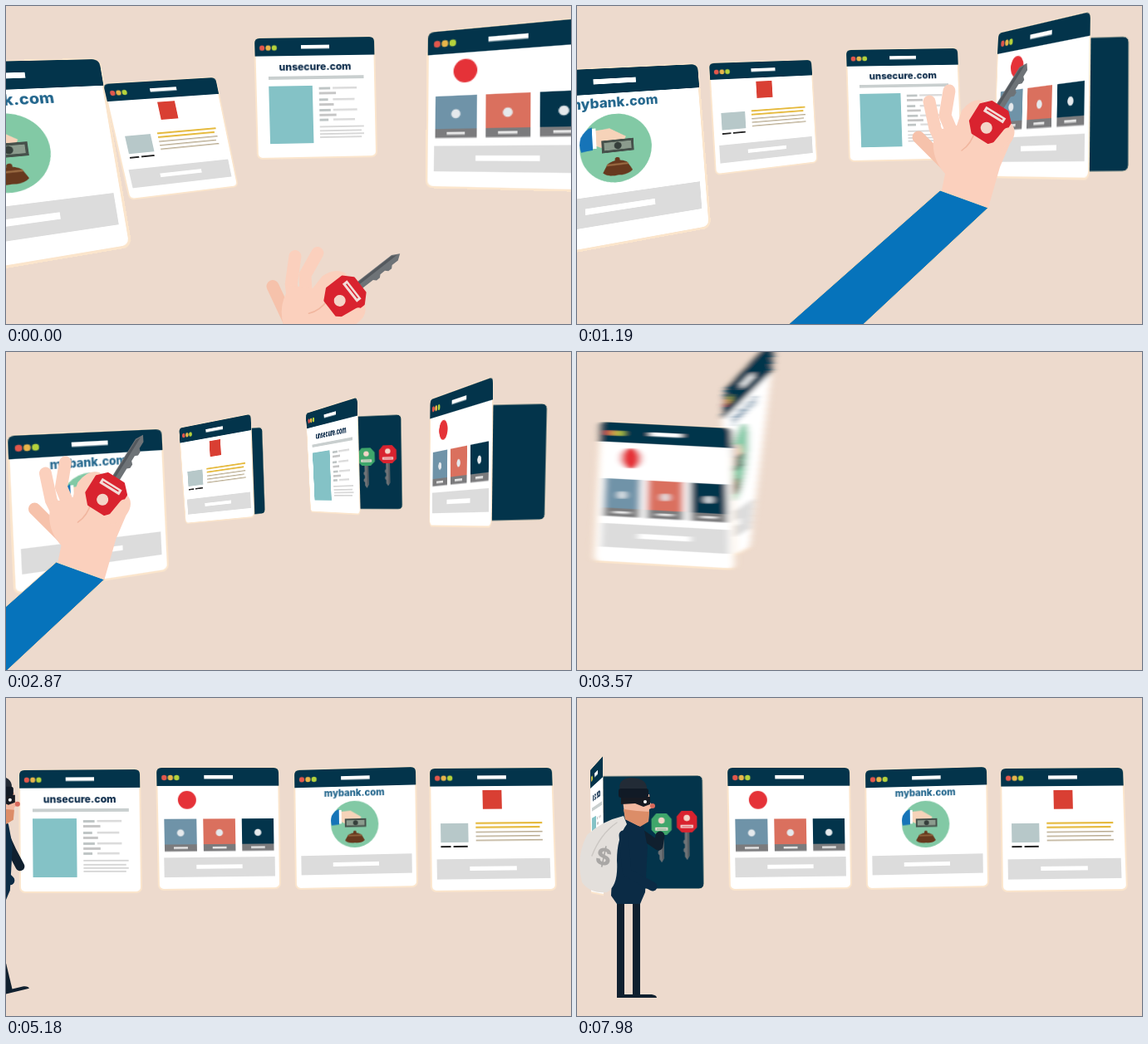
An HTML page that plays this animation: 680 px wide and 383 px high, repeating every 8 s.

```html
<!DOCTYPE html>
<html lang="en">
<head>
<meta charset="utf-8">
<title>One key for every site</title>
<style>
  html, body { margin: 0; width: 100%; height: 100%; overflow: hidden; background: #eddacd; }
  #stage { position: relative; width: 680px; height: 383px; overflow: hidden; }
  #cards, #actors { position: absolute; left: 0; top: 0; width: 680px; height: 383px; }
  .card { position: absolute; left: 0; top: 0; overflow: visible; transform-origin: 0 0; }
  text { font-family: Inter, sans-serif; font-weight: 800; text-anchor: middle; }
</style>
</head>
<body>
<div id="stage">
  <div id="cards"></div>
  <svg id="actors" viewBox="0 0 680 383">
    <defs>
      <filter id="whip" x="-10%" width="120%"><feGaussianBlur id="blur" stdDeviation="0 0"/></filter>
    </defs>
    <g id="hand"></g>
    <g id="thief"></g>
  </svg>
</div>
<script>
const SIZE = 148, LOOP = 8000, STEP = 70;
const NAVY = '#03344b', GREY = '#dcdcdc', RED = '#d9232f', SKIN = '#fbd0bd', SUIT = '#0b2b45', DARK = '#10202f';
const $ = id => document.getElementById(id);

// ---------- drawing helpers ----------
const rect = (x, y, w, h, fill, more = '') =>
  `<rect x="${x}" y="${y}" width="${w}" height="${h}" fill="${fill}" ${more}/>`;
const circle = (x, y, r, fill) => `<circle cx="${x}" cy="${y}" r="${r}" fill="${fill}"/>`;
const shape = (d, fill, more = '') => `<path d="${d}" fill="${fill}" ${more}/>`;
const line = (d, color, width, more = '') =>
  `<path d="${d}" fill="none" stroke="${color}" stroke-width="${width}" stroke-linecap="round" stroke-linejoin="round" ${more}/>`;
const footer = (y, w = 135) => rect(7, y, w, 24, GREY) + rect(46, y + 9, 56, 5, '#fff');

function key(color, transform) {
  return `<g transform="${transform}">
    ${shape('M-5-18V-75L0-84 5-77V-68L8-65V-60L5-57V-50L8-47V-42L5-39V-18Z', '#6e7377')}
    ${shape('M-4-18V-74L-1-80V-18Z', '#54595e')}
    ${shape('M-11-22H11L21-12V11L11 22H-11L-21 11V-12Z', color, `stroke="${color}" stroke-width="3" stroke-linejoin="round"`)}
    ${rect(-14, -14, 28, 7, '#f3dcd8')}${rect(-11, -11.5, 22, 1.5, color)}
    ${circle(0, 8, 7, '#f4d5c8')}
  </g>`;
}

// ---------- page contents, in a 148 px square ----------
const tile = (x, color) => rect(x, 62, 39, 31, color) + rect(x, 93, 39, 8.5, '#7b7b7d') +
  rect(x + 11, 96, 17, 2.5, '#e6e6e6') + circle(x + 19.5, 79, 4.3, '#e5e9ec');

const textRows = (ys, x, w, color, height = 1.8) =>
  ys.map((y, i) => rect(x, y, w - (i % 2) * 3, height, color)).join('');

const contents = {
  unsecure: `<text x="74" y="40" font-size="12.5" fill="#0c2b4a">unsecure.com</text>
    ${rect(16, 47, 118, 4, '#c9cfcf')}${rect(16, 59, 54, 71, '#84c2c6')}
    ${textRows([61, 75, 88, 100], 78, 14, '#bfc5c5', 3)}${textRows([61, 75, 88, 100], 95, 30, '#dadada', 2.5)}
    ${textRows([67, 81, 94], 78, 21, '#c6c6c6', 3)}${textRows([109, 114, 118, 122], 78, 55, '#d4d4d4')}`,
  bank: `<text x="73" y="34" font-size="11.4" fill="#21658c">mybank.com</text>
    ${circle(73, 69, 29, '#82c9a5')}
    ${shape('M45 58Q49 51 54 50V69L45 70Q43 64 45 58Z', '#1674b8')}${rect(54, 51, 3, 17, '#fff')}
    ${shape('M57 53L68 52 81 60 79 64 70 62 72 69 65 70 57 66Z', '#f6d3b9')}
    ${rect(61, 62, 26, 10.5, '#46514b')}${rect(63, 64, 22, 6.5, '#8b9b8d')}${circle(74, 67.3, 3, '#353f3b')}
    ${shape('M65 82Q73 77 81 82L85 89Q81 93 73 92Q65 93 61 89Z', '#67391e')}
    ${line('M65 83H81', '#9a6b42', 1.5)}${circle(73, 79, 2, '#67391e')}${footer(107)}`,
  shop: `${circle(36, 39, 11, '#e53238')}${tile(8, '#6f93a8')}${tile(55, '#da705e')}${tile(102, NAVY)}${footer(109)}`,
  mail: `${rect(63, 27, 23, 23, '#d93f33')}${rect(12, 67, 33, 23, '#b7c8c9')}
    ${rect(12, 94, 12, 2, '#222')}${rect(27, 94, 17, 2, '#222')}
    ${textRows([66, 71], 54, 80, '#e5b93c', 2.2)}${textRows([77, 82, 87], 54, 80, '#b9ab90', 1.5)}${footer(110)}`
};

const frontArt = name => `${rect(0, 0, SIZE, SIZE, '#fff', 'rx="6" stroke="#fbe5cc" stroke-width="2"')}
  ${shape('M0 22V6Q0 0 6 0H142Q148 0 148 6V22Z', NAVY)}
  ${circle(9, 12, 3.2, '#e2574c')}${circle(16.5, 12, 3.2, '#e8b54a')}${circle(24, 12, 3.2, '#b5d23c')}
  ${rect(57, 9, 35, 4.5, '#fff')}${contents[name]}`;

const backArt = name => rect(2, 7, 136, 137, NAVY, 'rx="6" stroke="#fbe5cc" stroke-width="1"') +
  (name === 'unsecure' ? key('#3fa66b', 'translate(87 66) rotate(180) scale(.55)') +
    key(RED, 'translate(118 63) rotate(180) scale(.55)') : '');

// ---------- timing ----------
const mix = (a, b, p) => a.map((v, i) => v + (b[i] - v) * p);
const smooth = p => p * p * (3 - 2 * p);
const easeOut = p => 1 - (1 - p) ** 3;
const linear = p => p;

// Each key is [time, ...values].
function track(keys, t, ease = linear) {
  if (t <= keys[0][0]) return keys[0].slice(1);
  for (let i = 1; i < keys.length; i++) {
    const [a, b] = [keys[i - 1], keys[i]];
    if (t < b[0]) return mix(a.slice(1), b.slice(1), ease((t - a[0]) / (b[0] - a[0])));
  }
  return keys[keys.length - 1].slice(1);
}

const shift = (quad, dx) => quad.map((v, i) => i % 2 ? v : v + dx);

// Quads run top left, top right, bottom right, bottom left.
function route(drift, entry, rest, whip) {
  const last = mix(drift[1], drift[2], 2.2);
  whip = whip || shift(last, -500);
  return [[0, ...drift[0]], [1190, ...drift[1]], [2030, ...drift[2]], [3360, ...last],
    [3570, ...whip], [3710, ...shift(whip, -320)], [3711, ...shift(entry, 320)],
    [4130, ...shift(entry, 320)], [4340, ...entry], [4900, ...rest]];
}

const cards = [
  { name: 'unsecure', lift: 16,
    route: route([[299, 39, 443, 37, 446, 181, 303, 184], [324, 53, 458, 51, 463, 184, 328, 187],
      [345, 65, 473, 61, 476, 189, 350, 190]],
      [446, 112, 562, 110, 564, 234, 450, 235], [16, 87, 161, 86, 163, 234, 17, 234]),
    door: [[2150, 0], [2700, 60], [3200, 60], [3400, 0], [6800, 0], [7500, 84]] },
  { name: 'bank', lift: 24,
    route: route([[-155, 70, 112, 64, 150, 289, -130, 336], [-72, 80, 145, 70, 160, 266, -65, 307],
      [-30, 92, 169, 83, 180, 264, -22, 298]],
      [530, 105, 662, 102, 664, 218, 534, 222], [347, 87, 493, 83, 495, 227, 349, 230],
      [178, 44, 240, -22, 208, 235, 160, 262]),
    door: [[3020, 0], [3200, 30], [3400, 0]] },
  { name: 'shop', lift: 28,
    route: route([[508, 32, 712, 13, 712, 223, 506, 218], [507, 33, 676, 28, 676, 204, 501, 206],
      [509, 47, 668, 43, 666, 205, 506, 208]],
      [382, 89, 515, 86, 512, 213, 391, 213], [181, 84, 328, 84, 330, 229, 184, 231],
      [28, 84, 186, 92, 190, 262, 20, 252]),
    door: [[560, 0], [1190, 49], [2030, 60], [3200, 60], [3400, 0]] },
  { name: 'mail', lift: 16,
    route: route([[117, 94, 252, 86, 279, 217, 149, 233], [159, 69, 282, 65, 289, 188, 167, 203],
      [187, 82, 301, 76, 306, 193, 195, 205]],
      [610, 28, 880, 0, 880, 300, 614, 253], [510, 85, 657, 84, 662, 231, 512, 233]),
    door: [[2620, 0], [3000, 50], [3200, 50], [3400, 0]] }
];

for (const card of cards) for (const [side, art] of [['back', backArt], ['front', frontArt]]) {
  $('cards').insertAdjacentHTML('beforeend',
    `<svg class="card" width="${SIZE}" height="${SIZE}">${art(card.name)}</svg>`);
  card[side] = $('cards').lastElementChild;
}

// Perspective matrix that maps the square page onto a quad.
function quadMatrix([x0, y0, x1, y1, x2, y2, x3, y3]) {
  const ax = x1 - x2, ay = y1 - y2, bx = x3 - x2, by = y3 - y2;
  const sx = x0 - x1 + x2 - x3, sy = y0 - y1 + y2 - y3, det = ax * by - bx * ay;
  const g = (sx * by - bx * sy) / det, h = (ax * sy - sx * ay) / det;
  const col = (...v) => v.map(n => (n / SIZE).toFixed(9)).join();
  return `matrix3d(${col(x1 - x0 + g * x1, y1 - y0 + g * y1, 0, g)},` +
    `${col(x3 - x0 + h * x3, y3 - y0 + h * y3, 0, h)},0,0,1,0,${x0},${y0},0,1)`;
}

function swing([x0, y0, x1, y1, x2, y2, x3, y3], degrees, lift) {
  const c = Math.cos(degrees * Math.PI / 180), s = Math.sin(degrees * Math.PI / 180) * lift;
  return [x0, y0, x0 + (x1 - x0) * c, y1 - s, x3 + (x2 - x3) * c, y2 + s / 5, x3, y3];
}

// ---------- hand with key, centred on the key's head ----------
$('hand').innerHTML = `
  ${line('M-86 18L-52 52', '#f6c2ab', 15)}
  ${shape('M-60 82L-424 404H-324L-2 103Z', '#0673bb', 'stroke="#f7d9b5"')}
  ${line('M-73-25L-66 8 -48 44', SKIN, 15)}${line('M-49-38L-54-8 -38 30', SKIN, 15)}
  ${shape('M-58 82L-54 62Q-74 40-66 10L-40 4-34-14Q-22-30-8-26L8-12 26 2Q34 12 24 26L12 54-2 103Z', SKIN)}
  ${line('M-34 34Q-22 26-18 10', '#f1b69f', 1.5)}
  ${key(RED, 'rotate(32)')}
  ${line('M8 30L22 13', SKIN, 13)}`;

const handPath = [[0, 408, 350, 20], [490, 510, 148, 0], [1190, 497, 140, 0], [1750, 350, 172, 0],
  [2100, 348, 169, 0], [2520, 208, 170, 0], [2660, 208, 168, 0], [2970, 92, 172, 0],
  [3090, 92, 170, 0], [3360, -80, 430, 10]];

// ---------- burglar ----------
const leg = (id, x) => `<g id="${id}">${rect(x, 236, 9, 124, DARK)}${shape(`M${x} 357H${x + 23}Q${x + 29} 358 ${x + 29} 361H${x}Z`, DARK)}</g>`;
$('thief').innerHTML = `
  ${leg('legA', 48)}${leg('legB', 67)}
  <path id="farArm"/>
  ${shape('M52 146Q68 142 80 154L85 180 82 234 76 248H48L41 238 44 180Z', SUIT)}
  ${shape('M56 142Q30 148 12 165Q-2 192 6 222Q16 236 36 234Q50 226 48 196Q48 168 60 152Z', '#e3dfdb')}
  ${line('M48 150Q28 164 18 190', '#cbc7c3', 1.5)}
  <text x="32" y="201" font-size="28" fill="#a9a7a5" transform="rotate(12 32 192)">$</text>
  ${shape('M54 116H87L88 126 93 131 87 134 86 148 74 154 58 146Z', '#f2b79f')}
  ${shape('M56 134L72 136 87 137 86 149 76 155 58 146Z', '#dc8d68')}
  ${shape('M53 119H88V128L80 131 70 127 53 128Z', '#171a22')}${circle(82, 125, 2, '#fff')}${circle(91, 130, 3, '#d8695c')}
  ${shape('M52 112Q48 98 64 96Q82 96 84 107V112Z', '#222b36')}${rect(50, 109, 36, 11, '#111a26', 'rx="3"')}
  <path id="nearArm"/>`;

for (const id of ['farArm', 'nearArm'])
  for (const [name, value] of Object.entries({ fill: 'none', stroke: id === 'farArm' ? DARK : SUIT,
    'stroke-width': 11, 'stroke-linecap': 'round', 'stroke-linejoin': 'round' }))
    $(id).setAttribute(name, value);

const nearArm = [[5600, 56, 165, 60, 200, 82, 222], [5900, 56, 165, 88, 193, 116, 150],
  [6760, 56, 165, 88, 193, 116, 150], [7300, 56, 165, 60, 210, 91, 227]];
const farArm = [[5600, 72, 160, 84, 186, 94, 205], [5900, 72, 160, 94, 174, 114, 153],
  [6760, 72, 160, 94, 174, 114, 153], [7400, 72, 160, 98, 178, 100, 166]];

function drawThief(t) {
  const walking = t < 5740;
  const [x] = track([[4760, -135], [5740, 0]], t);
  const stride = walking ? Math.sin(t / 95) * 15 : 0;
  $('thief').setAttribute('transform', `translate(${x} ${-Math.abs(stride) / 6})`);
  $('legA').setAttribute('transform', `rotate(${stride} 53 238)`);
  $('legB').setAttribute('transform', `rotate(${-stride} 71 238)`);
  const picking = t > 5900 && t < 6760 ? Math.sin((t - 6370) / 60) * 2 : 0;
  for (const [id, keys] of [['nearArm', nearArm], ['farArm', farArm]]) {
    const p = track(keys, t, smooth);
    $(id).setAttribute('d', `M${p[0]} ${p[1]}L${p[2]} ${p[3]} ${p[4] + picking} ${p[5] - picking}`);
  }
}

function draw(t) {
  for (const { route, door, lift, front, back } of cards) {
    const quad = track(route, t, t > 4340 ? easeOut : linear);
    const [angle] = track(door, t, smooth);
    back.style.visibility = angle ? 'visible' : 'hidden';
    back.style.transform = quadMatrix(quad);
    front.style.transform = quadMatrix(swing(quad, angle, lift));
  }
  const [blur] = track([[3360, 0], [3500, 4], [4340, 4], [4700, 0]], t);
  $('blur').setAttribute('stdDeviation', `${blur} 0`);
  $('cards').style.filter = blur ? 'url(#whip)' : 'none';

  const [x, y, turn] = track(handPath, t, smooth);
  $('hand').setAttribute('transform', `translate(${x} ${y}) rotate(${turn})`);
  $('hand').style.display = t < 3360 ? '' : 'none';
  drawThief(t);
}

const start = performance.now();
function tick() {
  const t = (performance.now() - start) % LOOP;
  draw(Math.floor(t / STEP) * STEP);
  requestAnimationFrame(tick);
}
tick();
</script>
</body>
</html>
```
